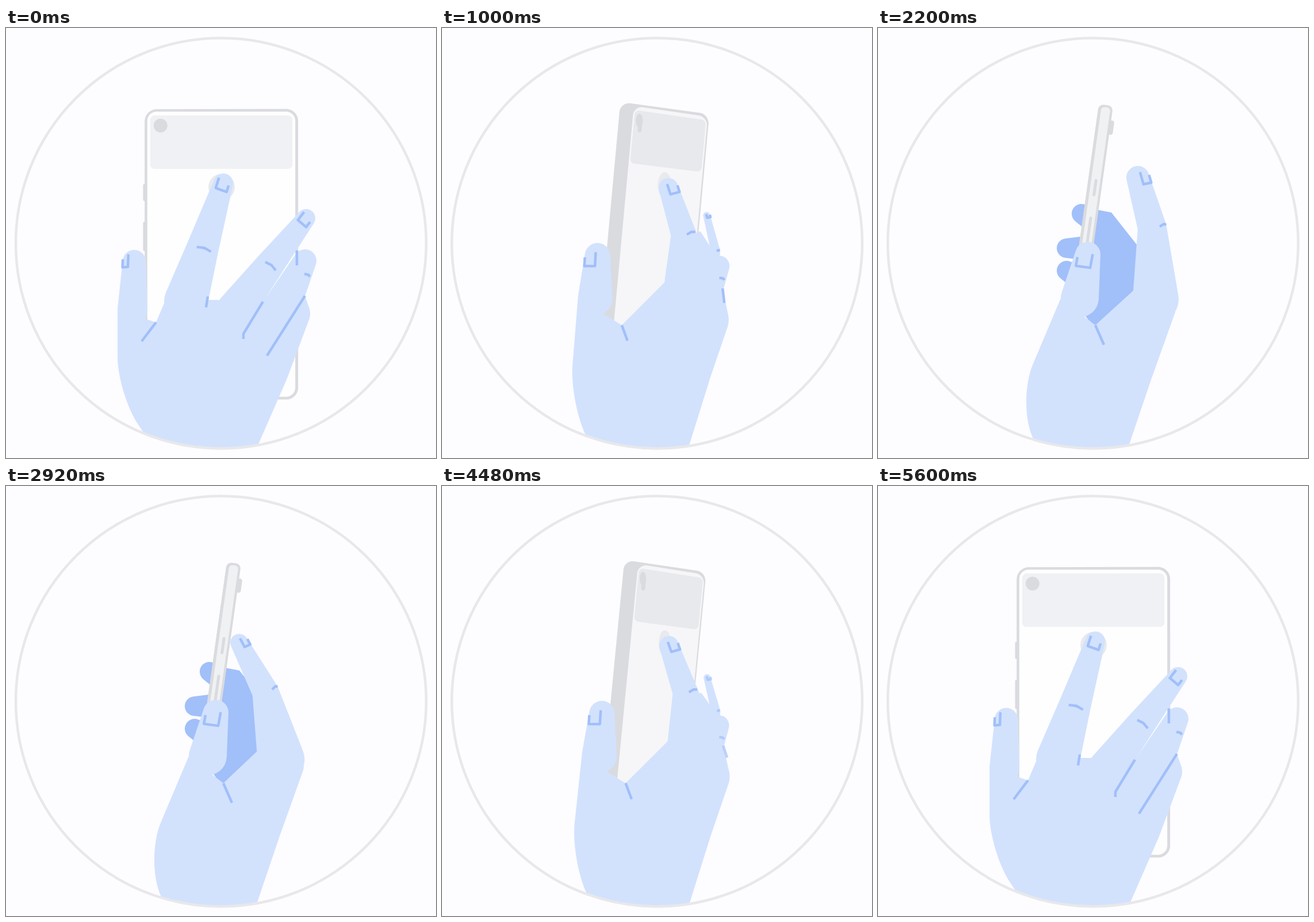
An HTML page for the animation above (5.64 s loop, 748 by 748 pixels).

```html
<!DOCTYPE html>
<html lang="en">
<head>
<meta charset="utf-8">
<title>Tap the back of the phone</title>
<style>
html, body { margin: 0; width: 100%; height: 100%; overflow: hidden; background: #fdfcff; }
svg { display: block; width: 100vw; height: 100vh; }
</style>
</head>
<body>
<svg viewBox="0 0 748 748">
  <clipPath id="disc"><circle cx="374" cy="374.5" r="357"/></clipPath>
  <g id="scene" clip-path="url(#disc)"></g>
  <circle cx="374" cy="374.5" r="357" fill="none" stroke="#e8e8eb" stroke-width="4.5"/>
</svg>
<script>
const LOOP = 5640;
const HALF_TURNED = .66; // turn progress of the middle hand pose
const SKIN = '#d2e2fd', SHADE = '#a1bff9', GREY = '#dadbdf';
const PHONE = { w: 267, h: 505, d: 25, eye: 8000 };

const lerp = (a, b, t) => a + (b - a) * t;
const clamp = (x, lo = 0, hi = 1) => Math.max(lo, Math.min(hi, x));
const ramp = (x, a, b) => clamp((x - a) / (b - a));
const mix = (a, b, t) => a.map((v, i) => lerp(v, b[i], t));
const rad = deg => deg * Math.PI / 180;
const tone = (a, b, t) => `rgb(${mix(a, b, t).map(Math.round)})`;
const group = (list, n) => Array.from({ length: list.length / n }, (_, i) => list.slice(i * n, i * n + n));

function ease(x, x1, x2) {
  // cubic bezier (x1, 0, x2, 1)
  let lo = 0, hi = 1;
  for (let i = 0; i < 24; i++) {
    const s = (lo + hi) / 2, r = 1 - s;
    if (3 * r * r * s * x1 + 3 * r * s * s * x2 + s ** 3 < x) lo = s; else hi = s;
  }
  return lo * lo * (3 - 2 * lo);
}

// ---- shapes ----

// closed polygon with softened corners; size(i) is the corner cut
function rounded(pts, size) {
  const n = pts.length;
  return pts.map((p, i) => {
    const r = size(i);
    const cut = j => {
      const q = pts[j], len = Math.hypot(q[0] - p[0], q[1] - p[1]) || 1;
      return mix(p, q, Math.min(r, r * len / (r + size(j) || 1)) / len);
    };
    const a = cut((i + n - 1) % n), b = cut((i + 1) % n);
    return `${i ? 'L' : 'M'}${a}C${mix(a, p, .55)} ${mix(b, p, .55)} ${b}`;
  }).join('') + 'Z';
}

// hull of two circles [x, y, r]
function capsule([x, y, r], [X, Y, R]) {
  const dist = Math.hypot(X - x, Y - y) || 1;
  const dir = Math.atan2(Y - y, X - x), open = Math.acos(clamp((r - R) / dist, -1, 1));
  const on = (cx, cy, cr, a) => [cx + cr * Math.cos(a), cy + cr * Math.sin(a)];
  const wide = open > Math.PI / 2 ? 1 : 0;
  return `M${on(x, y, r, dir - open)}L${on(X, Y, R, dir - open)}` +
    `A${R} ${R} 0 ${wide} 1 ${on(X, Y, R, dir + open)}` +
    `L${on(x, y, r, dir + open)}A${r} ${r} 0 ${1 - wide} 1 ${on(x, y, r, dir - open)}Z`;
}
const limb = joints => joints.slice(1).map((j, i) => capsule(joints[i], j)).join('');
const polyline = pts => 'M' + pts.join('L');

// marks [angle around the finger, position along it], both relative to a joint
function wrap([x, y, r], from, to, roll, marks) {
  const len = Math.hypot(to[0] - from[0], to[1] - from[1]) || 1;
  const ux = (to[0] - from[0]) / len, uy = (to[1] - from[1]) / len;
  return polyline(marks.map(([deg, along]) => {
    const across = r * Math.sin(rad(clamp(roll + deg, -90, 90))), f = along * r;
    return [x + ux * f - uy * across, y + uy * f + ux * across];
  }));
}
const NAIL = [[-36, .4], [-36, -.7], [36, -.75], [36, -.05]];
const CREASE = [[-22, -.04], [6, .05], [34, -.05]];

// ---- hand: key points seen from the back, half turned and from the side ----

const heel = [
  [260, 735, 194, 636, 194, 490],
  [268, 745, 222, 650, 237, 470],
  [281, 745, 244, 645, 318, 470]
];
// webs between the fingers, outer knuckle, wrist
const palm = [
  [261, 512, 278, 472, 362, 473, 447, 476, 520, 466, 531, 497, 488, 612, 432, 740],
  [313, 517, 386, 444, 449, 352, 480, 400, 488, 453, 500, 510, 466, 610, 424, 745],
  [378, 517, 437, 461, 460, 420, 480, 400, 500, 440, 520, 486, 475, 612, 430, 745]
];
// joints as circles from tip to root
const thumb = [
  [223, 406, 20, 220, 490, 26],
  [271, 396, 22, 267, 470, 30],
  [365, 394, 22, 351, 470, 33]
];
const index = [
  [378, 270, 17, 342, 383, 28, 313, 475, 38],
  [394, 278, 17, 421, 360, 22, 430, 440, 42],
  [401, 274, 15, 449, 360, 23, 478, 476, 41]
];
const raisedIndex = [452, 260, 20, 477, 348, 25, 483, 472, 40];
const ring = [
  [522, 331, 16, 459, 412, 25, 398, 492, 33],
  [460, 326, 6, 476, 388, 8, 462, 410, 20],
  [470, 400, 5, 478, 430, 8, 470, 450, 20]
];
const pinky = [
  [520, 405, 20, 470, 505, 35],
  [482, 414, 18, 462, 460, 25],
  [480, 440, 14, 465, 480, 25]
];
const foldEnd = [[236, 545], [323, 544], [393, 551]];

const pose = ([a, b, c], t) => t < HALF_TURNED
  ? mix(a, b, t / HALF_TURNED)
  : mix(b, c, ramp(t, HALF_TURNED, 1));

// parabola through the three poses
const arcPose = ([a, b, c], t) => {
  const m = HALF_TURNED;
  const wa = (t - m) * (t - 1) / m, wb = t * (t - 1) / (m * (m - 1)), wc = t * (t - m) / (1 - m);
  return a.map((v, i) => v * wa + b[i] * wb + c[i] * wc);
};

// ---- scene ----

const scene = document.getElementById('scene');
function set(node, attrs) {
  for (const k in attrs) node.setAttribute(k, attrs[k]);
  return node;
}
function add(tag, attrs = {}) {
  return set(scene.appendChild(document.createElementNS('http://www.w3.org/2000/svg', tag)), attrs);
}

const behind = add('path', {
  fill: SHADE,
  d: rounded([[370, 314], [406, 321], [455, 383], [455, 470], [379, 525], [360, 500]], () => 1) +
     limb([[354, 323, 17], [374, 338, 18]]) +
     limb([[328, 383, 17], [360, 383, 21]]) +
     limb([[328, 422, 17], [345, 432, 20]])
});
const shell = add('path', { fill: GREY });
const side = add('path', { fill: GREY });
const back = add('path');
const panel = add('path');
const sensor = add('ellipse', { fill: '#e9eaed' });
const bump = add('path', { fill: GREY });
const camera = add('ellipse', { fill: GREY });
const rim = add('path', { fill: '#eff1f3' });
const buttons = add('path', { stroke: GREY, 'stroke-width': 5, 'stroke-linecap': 'round' });
const skin = add('path', { fill: SKIN });
const pen = fill => add('path', { fill, stroke: SHADE, 'stroke-width': 4.5, 'stroke-linejoin': 'round' });
const lines = pen('none'), knuckle = pen(SHADE), outerLines = pen('none');

function drawPhone(turn) {
  const { w, h, d, eye } = PHONE;
  const sin = Math.sin(rad(90 * turn)), cos = Math.cos(rad(90 * turn)), lean = rad(8 * turn);
  const [cx, cy] = mix([374.5, 393.5], [361.5, 384], turn);
  const project = (x, y, z) => {
    const zoom = 1 + (z * cos - (x + w / 2) * sin) / eye;
    const px = (x * cos + z * sin) * zoom, py = y * zoom;
    return [cx + px * Math.cos(lean) - py * Math.sin(lean), cy + px * Math.sin(lean) + py * Math.cos(lean)];
  };
  const slab = (x1, z1, x2, z2, top, bottom, r) => rounded(
    [project(x1, top, z1), project(x2, top, z2), project(x2, bottom, z2), project(x1, bottom, z1)], () => r);
  const shown = 1 - ramp(turn, .86, .98), dim = ramp(turn, .1, HALF_TURNED), edgeOn = ramp(turn, .75, 1);
  const dot = (node, x, y, r) => {
    const [px, py] = project(x, y, d / 2);
    set(node, { cx: px, cy: py, rx: r * cos, ry: r, opacity: shown });
  };

  set(shell, { d: slab(-w / 2, -d / 2, w / 2, d / 2, -h / 2, h / 2, lerp(21, 9, ramp(turn, .5, 1))) });
  set(side, { d: slab(-w / 2, -d / 2, -w / 2, d / 2, -h / 2, h / 2, 9), opacity: edgeOn });
  set(back, {
    d: slab(5 - w / 2, d / 2, w / 2 - 5, d / 2, 5 - h / 2, h / 2 - 5, 16),
    fill: tone([254, 254, 255], [246, 246, 248], dim), opacity: shown
  });
  set(panel, {
    d: slab(-123.5, d / 2, 123.5, d / 2, -241, -148, 8),
    fill: tone([239, 241, 244], [232, 233, 237], dim), opacity: shown
  });
  dot(sensor, .5, -116.5, 23);
  dot(camera, -105.5, -223.5, 12);
  set(bump, { d: slab(-105, d / 2 - 2, -105, d / 2 + 6, -228, -203, 4) });
  set(rim, { d: slab(-w / 2, 5 - d / 2, -w / 2, d / 2 - 4, 4 - h / 2, h / 2 - 4, 6), opacity: edgeOn });
  const button = (top, bottom) => polyline([project(-w / 2, top, 1), project(-w / 2, bottom, 1)]);
  set(buttons, { d: button(-120, -95) + button(-54, -8) });
}

function drawHand(turn, lift) {
  const heelPts = group(arcPose(heel, turn), 2), palmPts = group(pose(palm, turn), 2);
  const [web, , indexWeb, ringWeb, pinkyWeb] = palmPts;
  const thumbJ = group(arcPose(thumb, turn), 3);
  const indexJ = group(pose([index[0], index[1], mix(index[2], raisedIndex, lift)], turn), 3);
  const ringJ = group(pose(ring, turn), 3), pinkyJ = group(pose(pinky, turn), 3);

  // the palm's inner corner follows the index finger
  const inner = mix(palmPts[1], [444, 457], lift);
  const outline = [...heelPts, web, inner, ...palmPts.slice(2)];
  const corner = i => i === 1 ? 65 : i === 8 ? 10 : 2;
  set(skin, { d: rounded(outline, corner) + [thumbJ, indexJ, ringJ, pinkyJ].map(limb).join('') });

  const roll = 54 * turn;
  const thumbNail = NAIL.map(([deg, along]) => [-deg, along + lerp(.2, -.3, turn)]);
  set(lines, {
    d: wrap(thumbJ[0], thumbJ[1], thumbJ[0], -68 + 54 * turn * turn, thumbNail) +
       wrap(indexJ[0], indexJ[1], indexJ[0], roll, NAIL) +
       polyline([web, pose(foldEnd, turn)])
  });
  set(knuckle, { d: wrap(indexJ[1], indexJ[1], indexJ[0], roll, CREASE) });

  // lines between the outer fingers shorten as the hand turns
  const k = 1 - ramp(turn, 0, .39);
  const stroke = ([x, y], ...steps) => polyline([[x, y], ...steps.map(([dx, dy]) => [x + dx, y + dy])]);
  const short = (p, ...steps) => k ? stroke(p, ...steps.map(s => s.map(v => v * k))) : '';
  set(outerLines, {
    d: wrap(ringJ[0], ringJ[1], ringJ[0], roll, NAIL) +
       wrap(ringJ[1], ringJ[1], ringJ[0], roll, CREASE) +
       wrap(pinkyJ[0], pinkyJ[1], pinkyJ[0], 50, CREASE.map(([deg, along]) => [deg, along - 1])) +
       short([indexWeb[0] - 11, indexWeb[1] - 6], [-3, 19]) +
       short(ringWeb, [-34, 56], [-34, 65]) +
       short([pinkyJ[0][0] - 14, pinkyJ[0][1] - 18], [0, 26]) +
       stroke(pinkyWeb, [-66 + 105 * turn, 104 - 120 * turn]),
    opacity: 1 - ramp(turn, .67, .74)
  });
}

function draw(t) {
  const turn = t < 4080
    ? ease(ramp(t, 680, 1560), .38, .08)
    : 1 - ease(ramp(t, 4080, 5080), .4, .68);
  const lift = t < 2220
    ? ease(ramp(t, 1680, 2200), .4, .3)
    : 1 - ease(ramp(t, 2220, 3440), .25, .05);
  set(behind, { opacity: turn > HALF_TURNED ? 1 : 0 });
  drawPhone(turn);
  drawHand(turn, lift);
}

const start = performance.now();
function tick() {
  draw((performance.now() - start) % LOOP);
  requestAnimationFrame(tick);
}
tick();
</script>
</body>
</html>
```
